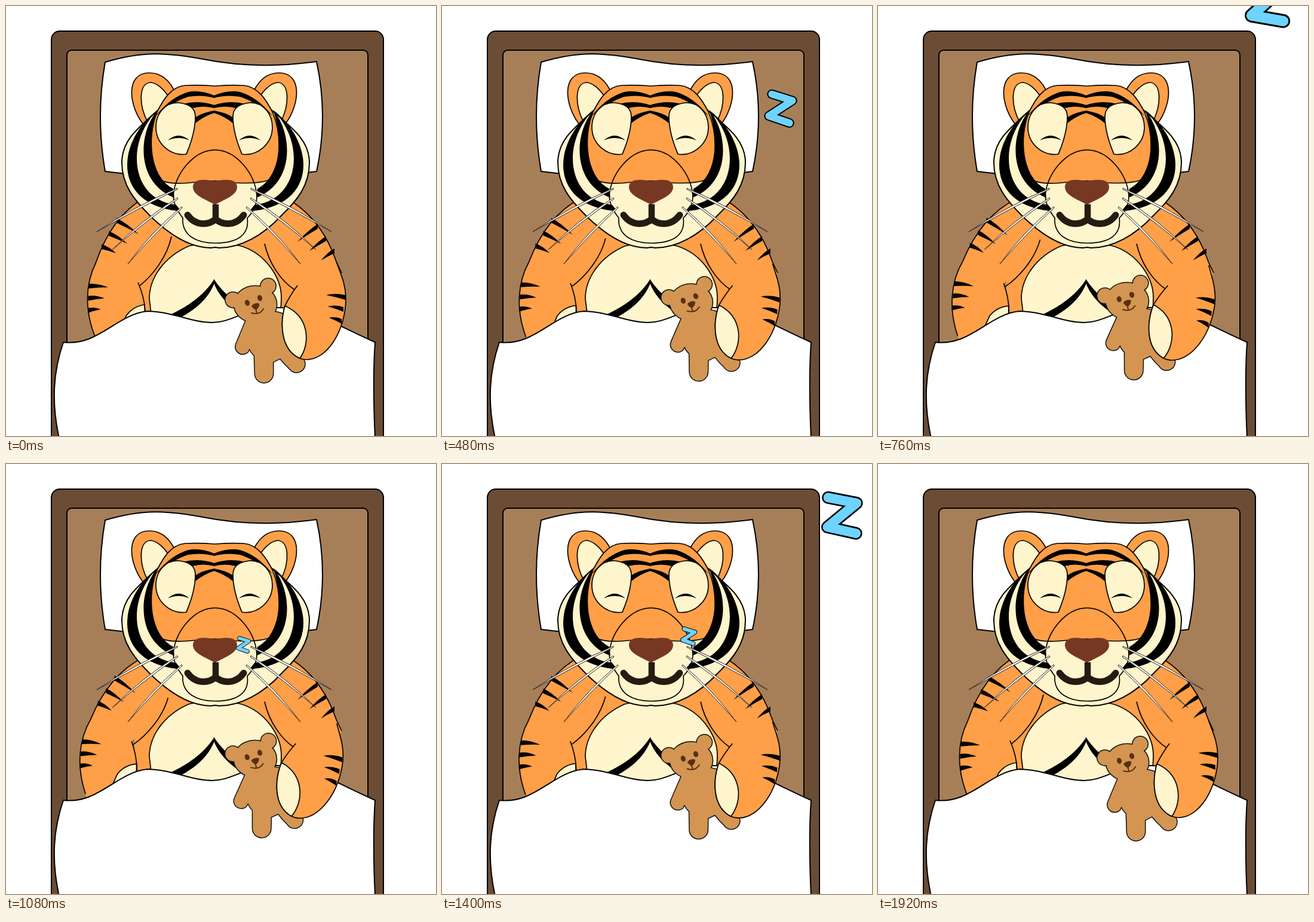
Recreate the animation shown at these times as an HTML page. Size 720 by 720 pixels, loop 1960 ms.

```html
<!DOCTYPE html>
<html lang="en">
<head>
<meta charset="utf-8">
<title>Sleeping tiger</title>
<style>
html, body { margin: 0; width: 100%; height: 100%; overflow: hidden; background: #fff; }
svg { display: block; width: 720px; height: 720px; }
.o { fill: #ff9f47; }
.c { fill: #fff5cc; }
.b { fill: #000; stroke: none; }
.n { fill: none; }
.p { stroke: none; }
.flip { transform: matrix(-1, 0, 0, 1, 697, 0); }
</style>
</head>
<body>
<svg viewBox="0 0 720 720" stroke="#000" stroke-width="1.7" stroke-linejoin="round">
  <defs>
    <g id="ear">
      <path class="o" d="M229,197C205,165 200,112 240,112C262,112 275,128 282,142"/>
      <path class="c" d="M237,194C222,165 222,128 243,128C255,130 268,143 274,156"/>
    </g>
    <g id="cheek" class="b">
      <path d="M254,174C186,225 176,330 286,343L292,342L285,333C210,325 198,230 254,174Z"/>
      <path d="M254,174C222,210 215,295 282,321L280,306C240,285 237,220 254,174Z"/>
    </g>
    <g id="brow" class="b">
      <path d="M349,150Q325,140 305,144Q275,153 251,184Q280,160 305,152Q328,148 349,154Z"/>
      <path d="M349,166Q322,157 296,164L312,171Q330,166 349,171Z"/>
      <path d="M349,175Q330,178 316,187V197Q332,184 349,179Z"/>
    </g>
    <g id="eye">
      <path class="c" d="M289,162C308,164 317,172 317,185C317,215 305,240 302,248C275,252 251,230 251,203C251,180 267,161 289,162Z"/>
      <path class="b" d="M271,225Q289,209 307,225Q289,217 271,225Z"/>
    </g>
    <g id="whiskers" fill="#fff" stroke="#2a2220">
      <path d="M287,305Q214,336 152,378Q217,341 287,307Z"/>
      <path d="M287,321Q228,358 178,408Q231,362 288,323Z"/>
      <path d="M294,336Q242,380 204,432Q246,383 295,338Z"/>
    </g>
    <g id="bearShape">
      <circle cx="380" cy="492" r="12.500"/>
      <circle cx="439" cy="469" r="12.500"/>
      <ellipse cx="417.500" cy="499.500" rx="35.500" ry="30.500"/>
      <path d="M402,526L385,567A12,12 0 0 0 405,579Q406,575 408,574Q411,581 416,585L417,616A15,15 0 0 0 447,615L447,596Q455,592 459,590Q467,600 475,607A13,13 0 0 0 498,592L480,560L470,520Q460,512 446,512Z"/>
    </g>
    <path id="zee" d="M-16,-25L19,-14L-21,12L14,24"/>
  </defs>

  <rect x="76" y="42" width="556" height="720" rx="14" fill="#6b4c35" stroke-width="2"/>
  <rect x="102" y="74" width="504" height="700" rx="8" fill="#a67f59" stroke-width="2"/>
  <path fill="#fff" stroke-width="2" d="M166,94C230,75 270,78 330,89C390,101 450,103 520,93Q540,185 520,277Q340,300 166,277Q150,185 166,94Z"/>

  <path class="o p" d="M215,330L480,325L500,520H215Z"/>
  <path class="o p" d="M470,322C505,342 535,375 553,428L562,447L545,480L480,520L400,400Z"/>
  <path class="n" d="M470,322C505,342 535,375 553,428L562,447M433,398C440,430 460,460 483,475"/>
  <path class="c" d="M306,402C265,420 240,455 240,490L246,540H455Q461,510 461,488C461,455 435,415 394,402Q350,392 306,402Z"/>
  <g class="b">
    <path id="chevron" d="M349,457Q325,495 270,519L288,524Q335,500 349,464Z"/>
    <use href="#chevron" class="flip"/>
  </g>
  <path id="shoulderMarks" class="b"/>

  <g id="leftArm">
    <path class="o p" d="M232,321C195,342 168,378 150,431C133,465 131,510 150,556L165,600H235L233,512Q232,488 221,463L260,420L277,386Z"/>
    <path class="c" d="M232,500Q212,503 201,519L195,535L233,530Z"/>
    <path class="n" d="M232,321C195,342 168,378 150,431C133,465 131,510 150,556M277,386C270,420 245,452 223,469M221,463Q232,488 233,512"/>
    <path id="leftMarks" class="b"/>
  </g>

  <path fill="#fff" stroke-width="2" d="M96,563C155,570 185,516 237,511C280,512 310,530 345,530C380,530 400,505 455,505C510,505 540,528 618,563C614,620 616,680 618,724H89C75,660 80,610 96,563Z"/>

  <g id="bear">
    <use href="#bearShape" fill="#d39551" stroke="#111" stroke-width="3"/>
    <use href="#bearShape" fill="#d39551" stroke="none"/>
    <g fill="#59300f" stroke="none">
      <ellipse cx="404" cy="497" rx="4" ry="5" transform="rotate(-18 404 497)"/>
      <ellipse cx="425" cy="489" rx="4" ry="5" transform="rotate(-18 425 489)"/>
      <path d="M411,502Q417,496 424,498Q425,504 419,509Q413,507 411,502Z"/>
    </g>
    <path class="n" stroke="#59300f" stroke-width="2" stroke-linecap="round" d="M418,507L420,514M411,514Q425,518 431,507"/>
  </g>

  <g id="forearm">
    <path class="o" d="M553,428C560,448 569,465 569,490C569,540 540,592 503,592Q497,592 492,590C459,575 459,530 467,502Q476,484 488,468"/>
    <path class="c" d="M467,502C459,530 459,575 492,590C510,565 508,520 467,502Z"/>
    <path id="forearmMarks" class="b"/>
  </g>

  <use href="#ear"/><use href="#ear" class="flip"/>
  <path class="c" stroke-width="2" d="M256,173C220,205 194,225 194,262C194,300 215,325 240,350C275,385 310,405 343,405L350,404L357,405C392,405 430,385 462,350C488,325 508,300 508,262C508,225 480,205 443,173Z"/>
  <path class="o" d="M253,177C262,160 275,135 300,133Q325,132 350,134Q375,132 398,133C423,135 437,160 446,177C462,215 462,270 439,292Q420,298 384,296Q350,290 318,295Q275,300 260,292C238,270 238,215 253,177Z"/>
  <use href="#cheek"/><use href="#cheek" class="flip" x="-4"/>
  <use href="#brow"/><use href="#brow" class="flip"/>
  <use href="#eye"/><use href="#eye" class="flip"/>
  <path class="n" d="M350,241C315,241 283,280 280,318C281,335 290,347 296,355C294,385 320,397 350,397C385,397 408,385 404,355C412,347 420,335 420,318C417,280 385,241 350,241Z"/>
  <path fill="#773823" stroke="none" d="M350,293C335,290 313,288 313,303C313,318 336,324 350,333C364,324 387,318 387,303C387,288 365,290 350,293Z"/>
  <path class="n" stroke="#241b12" stroke-width="11" stroke-linecap="round" d="M304,350C317,368 338,368 351,357C364,368 385,368 398,350"/>
  <path class="n" stroke="#241b12" stroke-width="10.500" d="M351,332V358"/>
  <g stroke-width="1"><use href="#whiskers"/><use href="#whiskers" class="flip"/></g>

  <g id="snores"></g>
</svg>
<script>
const LOOP = 1960, STEP = 40, INHALE = 920;
const el = id => document.getElementById(id);
const turn = (id, t) => el(id).setAttribute('transform', t);

// Three tapered fur marks: base x,y moves by stepX,stepY; reach shrinks each time
function furMarks(x, y, stepX, stepY, reach, drop, dropStep) {
  let d = '';
  for (let i = 0; i < 3; i++) {
    const bx = x + i * stepX, by = y + i * stepY;
    const dx = reach * (1 - i * .17), dy = drop + i * dropStep;
    const mx = bx + dx / 2, my = by + dy / 2;
    d += `M${bx},${by - 4}Q${mx},${my - 6} ${bx + dx},${by + dy}Q${mx},${my + 1} ${bx},${by + 4}Z`;
  }
  return d;
}
el('shoulderMarks').setAttribute('d', furMarks(522, 369, 14, 20.5, -34, 26, -5));
el('leftMarks').setAttribute('d', furMarks(185, 359, -12.5, 22, 37, 23, -6) + furMarks(138, 469, -.5, 20.5, 33, 2, -2));
el('forearmMarks').setAttribute('d', furMarks(568, 488, -3, 20, -32, -4, -1));

// Each snore leaves the mouth, speeds in px/ms, and bends upward or outward
const SNORES = [
  { start: 160, vx: .653, vy: .287, bend: .00038 },
  { start: 1080, vx: .95, vy: .58, bend: .0003 },
  { start: 1380, vx: .772, vy: .724, bend: -.0003 }
];
el('snores').innerHTML = SNORES.map((_, i) => `<g id="z${i}" fill="none" stroke-linecap="round">
  <use href="#zee" stroke-width="16"/><use href="#zee" stroke="#6fd3ff" stroke-width="12"/></g>`).join('');

function drawSnore({ start, vx, vy, bend }, i, t) {
  const age = t - start, curve = bend * age * age;
  const dx = vx * age - curve, dy = vy * age + curve;
  const visible = age >= 0 && dx < 334 && dy < 370;
  el('z' + i).style.display = visible ? '' : 'none';
  const size = .45 + .0025 * Math.hypot(dx, dy);
  const tilt = -20 * Math.max(0, size - 1);
  turn('z' + i, `translate(${398 + dx} ${303 - dy}) rotate(${tilt}) scale(${size})`);
}

function draw(t) {
  const phase = t < INHALE ? t / INHALE : 1 + (t - INHALE) / (LOOP - INHALE);
  const breath = (1 - Math.cos(Math.PI * phase)) / 2;
  turn('leftArm', `rotate(${4.1 * breath} 193 305)`);
  turn('bear', `rotate(${1.8 * breath} 610 485)`);
  turn('forearm', `rotate(${5.7 * breath} 487 440)`);
  SNORES.forEach((snore, i) => drawSnore(snore, i, t));
}

const start = performance.now();
function tick() {
  const t = (performance.now() - start) % LOOP;
  draw(Math.floor(t / STEP) * STEP);
  requestAnimationFrame(tick);
}
tick();
</script>
</body>
</html>
```
